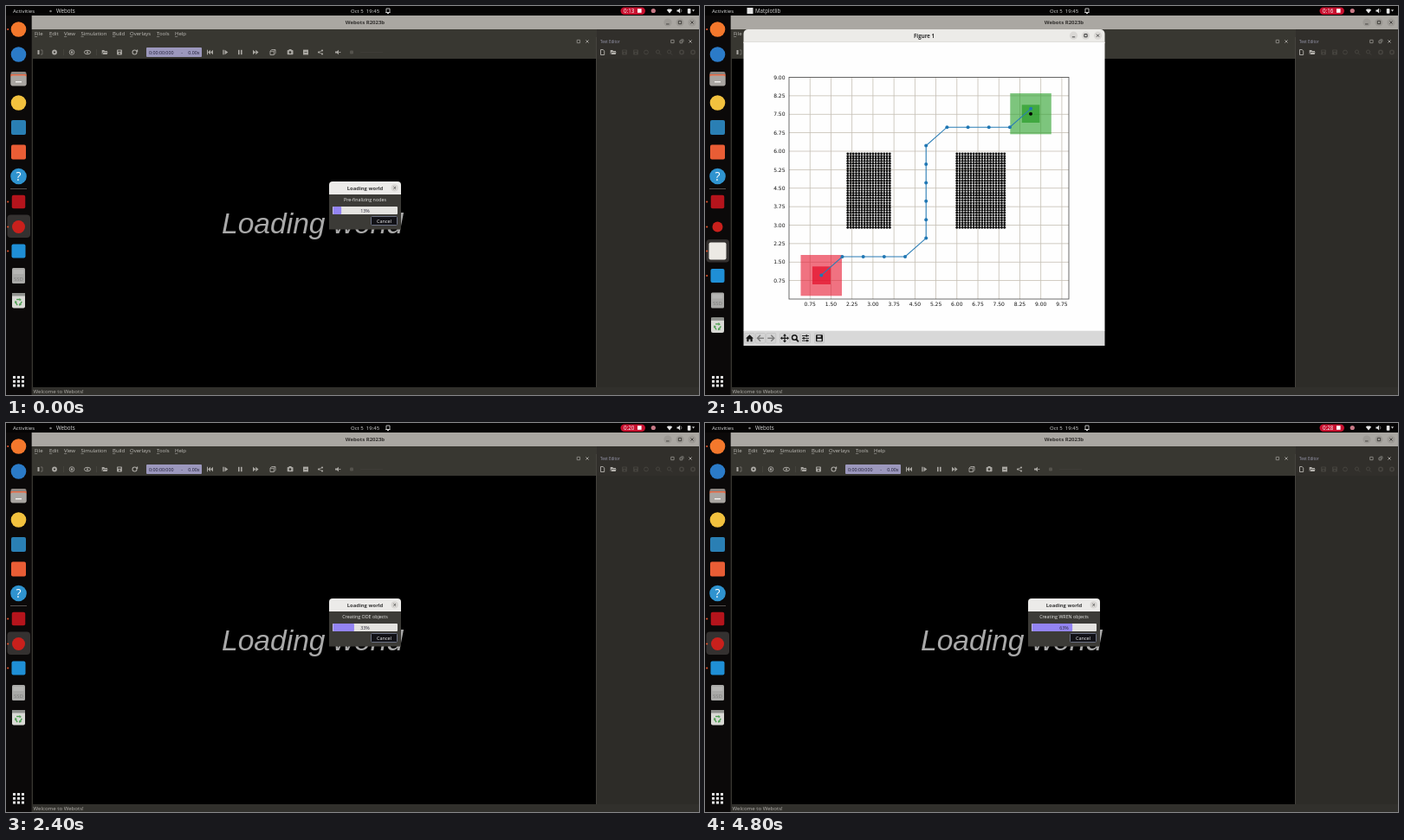
An HTML page with a canvas for the animation above (5 s loop, 800 by 450 pixels).

```html
<!DOCTYPE html>
<html lang="en">
<head>
<meta charset="utf-8">
<title>Loading world</title>
<style>
  html, body { margin: 0; width: 100%; height: 100%; overflow: hidden; background: #000; }
  canvas { display: block; width: 800px; height: 450px; }
</style>
</head>
<body>
<canvas id="stage" width="800" height="450"></canvas>
<script>
const c = document.getElementById('stage').getContext('2d');
const UI = '"Open Sans", "Noto Sans", sans-serif';
const STEP = 200, STEPS = 25;

// One value per 200 ms step.
const SECONDS = [13, 13, 13, 15, 15, 16, 17, 17, 18, 19, 19, 20, 20, 21, 22, 22, 23, 23, 24, 25, 25, 26, 26, 27, 28];
const PERCENT = [16, 20, 27, 33, 34, 36, 37, 38, 38, 42, 46, 46, 48, 54, 58, 63];
const FIG_OPEN = 3, FIG_DRAWN = 4, FIG_CLOSED = 9, ODE = 12, WREN = 22;

function rect(x, y, w, h, fill) { c.fillStyle = fill; c.fillRect(x, y, w, h); }

function round(x, y, w, h, r, fill, stroke) {
  c.beginPath();
  c.roundRect(x, y, w, h, r);
  if (fill) { c.fillStyle = fill; c.fill(); }
  if (stroke) { c.strokeStyle = stroke; c.lineWidth = 1; c.stroke(); }
}

function dot(x, y, r, fill) {
  c.beginPath();
  c.arc(x, y, r, 0, 7);
  c.fillStyle = fill;
  c.fill();
}

function ring(x, y, r, color, width = 1) {
  c.beginPath();
  c.arc(x, y, r, 0, 7);
  c.strokeStyle = color;
  c.lineWidth = width;
  c.stroke();
}

// Flat lists of x, y pairs relative to (x, y).
function trace(x, y, pts) {
  c.beginPath();
  for (let i = 0; i < pts.length; i += 2) c.lineTo(x + pts[i], y + pts[i + 1]);
}
function line(x, y, pts, color, width = 1) {
  trace(x, y, pts);
  c.strokeStyle = color;
  c.lineWidth = width;
  c.stroke();
}
function poly(x, y, pts, color) {
  trace(x, y, pts);
  c.fillStyle = color;
  c.fill();
}

function text(s, x, y, size, color, align = 'left', style = '', family = UI) {
  c.font = `${style} ${size}px ${family}`;
  c.textAlign = align;
  c.fillStyle = color;
  c.fillText(s, x, y);
}

function cross(x, y, r, color, width = 0.9) {
  line(x, y, [-r, -r, r, r], color, width);
  line(x, y, [-r, r, r, -r], color, width);
}

function topBar(k, figure) {
  rect(0, 0, 800, 11, '#050404');
  text('Activities', 8, 8, 6.1, '#dcdcdc');
  if (figure) {
    rect(48.5, 2, 7, 7, '#e4e4e4');
    text('Matplotlib', 58, 8, 6.2, '#dcdcdc');
  } else {
    dot(51.5, 6, 1.3, '#777');
    text('Webots', 58, 8, 6.2, '#dcdcdc');
  }
  text('Oct 5  19:45', 398, 8, 6, '#dcdcdc');
  line(441, 5.5, [-2, 2, -2, -2.5, 2, -2.5, 2, 2, -2.6, 2, 2.6, 2], '#cfcfcf', 0.9);
  rect(440, 8, 2, 1, '#cfcfcf');
  round(709.5, 1.5, 28.5, 8.5, 4.2, '#c8102f');
  text('0:' + SECONDS[k], 713, 8, 6.2, '#fff');
  rect(729, 3.2, 4.6, 4.6, '#fff');
  dot(747.3, 5.5, 2.6, '#c87986');
  poly(766, 6, [0, 2.6, -3.2, -1.4, -1.6, -2.4, 1.6, -2.4, 3.2, -1.4], '#e6e6e6');
  poly(777.5, 5.5, [-3, -1, -1.4, -1, 0.6, -3, 0.6, 3, -1.4, 1, -3, 1], '#e6e6e6');
  line(779, 5.5, [0, -1.8, 0.9, 0, 0, 1.8], '#aaa', 0.7);
  round(786.8, 3, 3.6, 5.8, 0.8, '#e6e6e6');
  poly(793.5, 5, [-1.6, -0.8, 1.6, -0.8, 0, 1.4], '#ccc');
}

function dockIcon(y, draw) { c.save(); c.translate(14.5, y); draw(); c.restore(); }

function dock(figure) {
  rect(0, 11, 29.5, 439, '#0b0909');
  const shift = figure ? 28.4 : 0;
  const disc = (color, r = 8.8) => () => dot(0, 0, r, color);
  const square = (color, s = 17) => () => round(-s / 2, -s / 2, s, s, 2, color);
  round(1.5, 241.5 + shift, 26.5, 26.5, 4, '#343130');

  dockIcon(27, disc('#f4782c'));
  dockIcon(56, disc('#2b7bc8'));
  dockIcon(84, () => {
    round(-9, -8, 18, 16, 2, '#8b8783');
    rect(-9, -5, 18, 3, '#e96a45');
    round(-9, -3.5, 18, 12, 2, '#a9a5a1');
    rect(-3.5, 3, 7, 1.5, '#f0eeec');
  });
  dockIcon(112, disc('#f2c13e'));
  dockIcon(140.5, square('#2a7fb4'));
  dockIcon(169, square('#e95d35'));
  dockIcon(197, () => {
    dot(0, 0, 9.3, '#2f93cf');
    text('?', 0, 5, 14, '#fff', 'center');
  });
  rect(5, 211, 19, 1, '#55504e');
  dockIcon(226.5, square('#b5141c', 15.5));
  dockIcon(255.5, disc('#c9201c', figure ? 6 : 7.5));
  if (figure) dockIcon(283.5, square('#ece9e4', 20));
  dockIcon(283.5 + shift, square('#1f8fd6', 16));
  dockIcon(312 + shift, () => {
    round(-7.5, -9, 15, 18, 1.5, '#a9a9a7');
    text('SSD', 0, 6, 6, '#7c7c7a', 'center');
    rect(-6, -7, 12, 5, '#b6b6b4');
  });
  dockIcon(340.5 + shift, () => {
    round(-7.5, -8.5, 15, 17.5, 2, '#d9d9d5');
    rect(-7.5, -8.5, 15, 3.5, '#8e908c');
    for (let i = 0; i < 3; i++) {
      c.save();
      c.translate(0, 2);
      c.rotate(i * Math.PI * 2 / 3);
      line(0, 0, [-2.4, -3, 1.4, -3], '#4ea052', 1.4);
      poly(0, 0, [1, -4.8, 3.4, -2.6, 1, -1.2], '#4ea052');
      c.restore();
    }
  });
  const running = [27, 226.5, 255.5, 283.5];
  if (figure) running.push(312);
  running.forEach(y => dot(2.2, y, 1.1, '#e1532c'));
  for (let i = 0; i < 9; i++) rect(8 + i % 3 * 5, 428 + Math.floor(i / 3) * 4.8, 3, 3, '#e4e4e4');
}

function toolbar() {
  const g = '#aaa8a3', y = 53.5;
  rect(36.5, 51, 2, 5, g);
  line(41, y, [-1, -2.5, 1, -2.5, 1, 2.5, -1, 2.5], '#77756f', 0.8);
  ring(56, y, 2, g, 1.8);
  ring(76, y, 2.8, g, 0.9); dot(76, y, 1.2, g);
  c.beginPath(); c.ellipse(94, y, 3.6, 2.2, 0, 0, 7); c.strokeStyle = g; c.lineWidth = 1; c.stroke();
  dot(94, y, 1.1, g);
  folder(114, y, g);
  floppy(131, y, g, '#383731');
  ring(148.5, y, 2.5, g, 1.1);
  rect(151, 50.5, 1.2, 2.5, g);
  [66, 104].forEach(x => rect(x, 50, 0.7, 7, '#4a4943'));

  round(162, 48, 64, 11, 1, '#9c98bd');
  text('0:00:00:000', 165, 55.5, 5.3, '#1d1b33');
  text('-', 203, 55.5, 5.3, '#1d1b33', 'center');
  text('0.00x', 223.5, 55.5, 5.3, '#1d1b33', 'right');

  rect(232, 50.7, 1, 5.6, g);
  poly(236, y, [0, -2.8, 0, 2.8, -3, 0], g);
  poly(239, y, [0, -2.8, 0, 2.8, -3, 0], g);
  rect(250.3, 50.7, 1.3, 5.6, g);
  poly(252.5, y, [0, -2.8, 3.8, 0, 0, 2.8], g);
  rect(268, 50.8, 1.6, 5.4, g); rect(271, 50.8, 1.6, 5.4, g);
  poly(285, y, [0, -2.8, 3.2, 0, 0, 2.8], g);
  poly(288.3, y, [0, -2.8, 3.2, 0, 0, 2.8], g);
  line(308, y, [-3, -1.2, 1.2, -1.2, 1.2, 3, -3, 3, -3, -1.2, -1.4, -3, 3, -3, 3, 1.2, 1.2, 3], g, 0.9);
  line(308, y, [1.2, -1.2, 3, -3], g, 0.9);
  round(324.7, 51, 6.8, 5.2, 0.8, g); rect(326.6, 50, 3, 1.5, g); dot(328, 53.6, 1.3, '#383731');
  rect(343, 50.6, 6, 5.8, g); rect(344.4, 53.2, 3.2, 0.7, '#383731');
  line(363, y, [2, -2, -2, 0, 2, 2], g, 0.8);
  [[2, -2], [-2, 0], [2, 2]].forEach(([a, b]) => dot(363 + a, y + b, 1.1, g));
  poly(383, y, [-3, -1, -1, -1, 1, -2.8, 1, 2.8, -1, 1, -3, 1], g);
  rect(384.5, 53, 1.8, 1, g);
  round(397, 51.5, 4, 4, 1, '#55534d');
  rect(409, 53, 26, 0.8, '#403e39');
}

function folder(x, y, color) {
  poly(x, y, [-3.3, 2.6, -3.3, -2.6, -0.8, -2.6, 0, -1.6, 3, -1.6, 3, -0.5, -1.8, -0.5], color);
  poly(x, y, [-2.6, 2.6, -1.4, 0.1, 3.6, 0.1, 2.6, 2.6], color);
}

function floppy(x, y, color, hole) {
  round(x - 2.9, y - 2.9, 5.8, 5.8, 0.7, color);
  rect(x - 1.7, y - 2.1, 3.2, 1.5, hole);
  dot(x, y + 1.2, 0.9, hole);
}

function editorPane() {
  const dim = '#46443f';
  rect(682, 61, 118, 380, '#2d2c28');
  rect(681, 36, 1, 405, '#44423d');
  text('Text Editor', 686, 43, 4.6, '#9a9ab0');
  round(767.7, 39.3, 3.4, 3.4, 0, null, '#85837e');
  round(778, 40, 2.8, 2.8, 0, null, '#85837e');
  line(779.3, 38.8, [0, 0, 2.7, 0, 2.7, 2.7], '#85837e', 0.8);
  cross(790, 41, 1.6, '#a5a39f');
  line(688.5, 53.5, [-2, -3, 0.8, -3, 2.2, -1.4, 2.2, 3, -2, 3, -2, -3], '#b5b3ae', 0.9);
  folder(701, 53.5, '#b5b3ae');
  floppy(714, 53.5, dim, '#312f2b');
  floppy(727, 53.5, dim, '#312f2b');
  ring(739, 53.5, 2.4, dim);
  [753, 766].forEach(x => { ring(x - 0.5, 53, 2, dim); line(x, 53.5, [1, 1, 3, 3], dim); });
  ring(780, 53.5, 2.2, dim, 1.6);
  ring(793, 53.5, 2.2, dim, 1.6);
}

function mainWindow() {
  rect(29.5, 11, 771, 16, '#aaa7a2');
  text('Webots R2023b', 414.5, 21.2, 6, '#33312f', 'center', 'bold');
  [764, 778, 792].forEach(x => dot(x, 19, 4.6, '#9d9a95'));
  rect(762, 20.5, 3.6, 0.9, '#403e3b');
  round(776.3, 17.3, 3.4, 3.4, 0, null, '#403e3b');
  cross(792, 19, 1.6, '#403e3b');

  rect(29.5, 27, 771, 423, '#383731');
  rect(682, 27, 118, 34, '#312f2b');
  const menu = [['File', 33], ['Edit', 50], ['View', 67], ['Simulation', 86.5], ['Build', 123], ['Overlays', 143], ['Tools', 174], ['Help', 195]];
  menu.forEach(([s, x]) => {
    text(s, x, 33.8, 6, '#c1bfba');
    rect(x, 35, 3.2, 0.6, '#a09e99');
  });
  round(659.2, 39.3, 3.4, 3.4, 0, null, '#85837e');
  cross(671, 41, 1.6, '#a5a39f');
  toolbar();
  editorPane();
  rect(31, 61, 650, 380, '#000');
  rect(29.5, 441, 771, 9, '#31302c');
  text('Welcome to Webots!', 31.5, 447.8, 6.1, '#b5b3ae');
}

function loading(k) {
  text('Loading world', 249, 263, 33.6, '#a9a9a9', 'left', 'italic', '"Liberation Sans", Arial, sans-serif');
  const pct = k < FIG_OPEN ? 13 : PERCENT[k - FIG_CLOSED];
  const label = k < ODE ? 'Pre-finalizing nodes' : k < WREN ? 'Creating ODE objects' : 'Creating WREN objects';
  rect(373, 217, 83, 41.5, '#3c3b37');
  round(373, 203, 83, 15, [4, 4, 0, 0], '#ecebe9');
  text('Loading world', 414.5, 212.8, 5.9, '#363636', 'center', 'bold');
  dot(448.7, 210.4, 4.1, '#d8d6d3');
  cross(448.7, 210.4, 1.3, '#444', 0.8);
  text(label, 414.5, 226, 5.35, '#e8e8e6', 'center');
  round(377, 232, 75, 9, 1, '#e4e3e0');
  round(377.5, 232, 74 * pct / 100, 9, 1, '#9384f3');
  text(pct + '%', 414.5, 238.6, 5.4, '#2b2938', 'center');
  round(421.5, 243.5, 30, 10, 1, '#111116', '#6b7183');
  text('Cancel', 436.5, 250.6, 5.5, '#f0f0f0', 'center');
}

function plot() {
  const X = v => 97 + 32.3 * v, Y = v => 339 - 28.5 * v;
  const mono = '"DejaVu Sans", sans-serif';
  for (let i = 1; i <= 13; i++) {
    const v = i * 0.75, label = v.toFixed(2);
    rect(X(v) - 0.4, 82.5, 0.8, 256.5, '#c5bfb4');
    text(label, X(v), 347.3, 6, '#111', 'center', '', mono);
    if (i > 12) continue;
    rect(97, Y(v) - 0.4, 323, 0.8, '#c5bfb4');
    text(label, 92.5, Y(v) + 2.2, 6, '#111', 'right', '', mono);
  }
  rect(110.5, 288, 47.5, 47.3, 'rgba(232,22,48,.6)');
  rect(124, 301.3, 21, 20.7, 'rgba(228,8,38,.68)');
  rect(352.3, 101, 47.5, 47.3, 'rgba(40,160,40,.6)');
  rect(365.8, 114.3, 20.6, 20.7, 'rgba(30,150,30,.62)');

  [[2.1, 16], [6, 18]].forEach(([x0, cols]) => {
    for (let i = 0; i < cols; i++)
      for (let j = 0; j < 31; j++) dot(X(x0 + i * 0.1), Y(2.9 + j * 0.1), 1.45, '#0a0a0a');
  });
  dot(376, 124.8, 2, '#000');

  // Path: D = diagonal, R = right, U = up.
  const path = [134.3, 311.4];
  let x = path[0], y = path[1];
  for (const s of 'DRRRDUUUUUDRRRD') {
    if (s !== 'U') x += 24.18;
    if (s !== 'R') y -= 21.4;
    path.push(x, y);
  }
  line(0, 0, path, '#2a7db5', 1.1);
  for (let i = 0; i < path.length; i += 2) dot(path[i], path[i + 1], 2, '#1f77b4');
  c.strokeStyle = '#4a4a4a';
  c.lineWidth = 0.8;
  c.strokeRect(97, 82.4, 323, 256.6);
}

function figureTools() {
  const y = 384.3, ink = '#161616', grey = '#7d7d7d';
  [51.5, 64, 76.3, 92, 104, 116, 132].forEach(x => round(x - 5.5, 378.5, 11, 11.5, 1, '#d3d3d3', '#c6c6c6'));
  poly(51.5, y, [-4.5, 0.3, 0, -4, 4.5, 0.3, 3.2, 0.3, 3.2, 4, 1, 4, 1, 1.2, -1, 1.2, -1, 4, -3.2, 4, -3.2, 0.3], ink);
  [[64, 1], [76.3, -1]].forEach(([x, d]) => {
    line(x, y, [4 * d, 0, -3 * d, 0], grey, 1.5);
    line(x, y, [0, -3.5, -3.5 * d, 0, 0, 3.5], grey, 1.5);
  });
  line(92, y, [-4, 0, 4, 0], ink, 1.2);
  line(92, y, [0, -4, 0, 4], ink, 1.2);
  for (let i = 0; i < 4; i++) {
    c.save(); c.translate(92, y); c.rotate(i * Math.PI / 2);
    poly(0, 0, [-2, -2.8, 0, -5, 2, -2.8], ink);
    c.restore();
  }
  ring(103.3, y - 0.8, 2.8, ink, 1.5);
  line(104, y, [1.2, 1.2, 4, 4], ink, 1.8);
  [-2.8, 0, 2.8].forEach((d, i) => {
    rect(112, y + d - 0.4, 8, 0.9, ink);
    rect([116.5, 113.3, 117][i], y + d - 1.2, 1.6, 2.4, ink);
  });
  round(128, y - 4, 8, 8, 1, ink);
  rect(129.7, y - 3, 4, 2, '#d3d3d3');
  rect(129.4, y + 0.6, 5.2, 2.6, '#d3d3d3');
}

function figureWindow(drawn) {
  round(44.5, 27, 417, 16, [5, 5, 0, 0], '#ecebe8');
  rect(44.5, 41.5, 417, 0.7, '#d4d2cf');
  text('Figure 1', 253, 36.8, 6.1, '#333', 'center', 'bold');
  [425.5, 439.5, 453.5].forEach(x => dot(x, 34.2, 4.6, '#dad8d5'));
  rect(423.8, 35.4, 3.4, 0.9, '#3b3b3b');
  round(437.9, 32.6, 3.2, 3.2, 0, null, '#3b3b3b');
  cross(453.5, 34.2, 1.6, '#3b3b3b');
  rect(44.5, 42, 417, 334, '#fefefe');
  rect(44.5, 375.7, 417, 17.3, '#d8d8d8');
  if (drawn) {
    plot();
    figureTools();
  } else {
    [85, 124.5].forEach(x => rect(x, 379, 0.8, 10, '#b9b9b9'));
  }
}

function frame(now) {
  const k = Math.floor(now / STEP) % STEPS;
  const figure = k >= FIG_OPEN && k < FIG_CLOSED;
  mainWindow();
  topBar(k, figure);
  dock(figure);
  if (figure) figureWindow(k >= FIG_DRAWN);
  else loading(k);
}

const start = performance.now();
function tick() {
  frame(performance.now() - start);
  requestAnimationFrame(tick);
}
tick();
</script>
</body>
</html>
```
